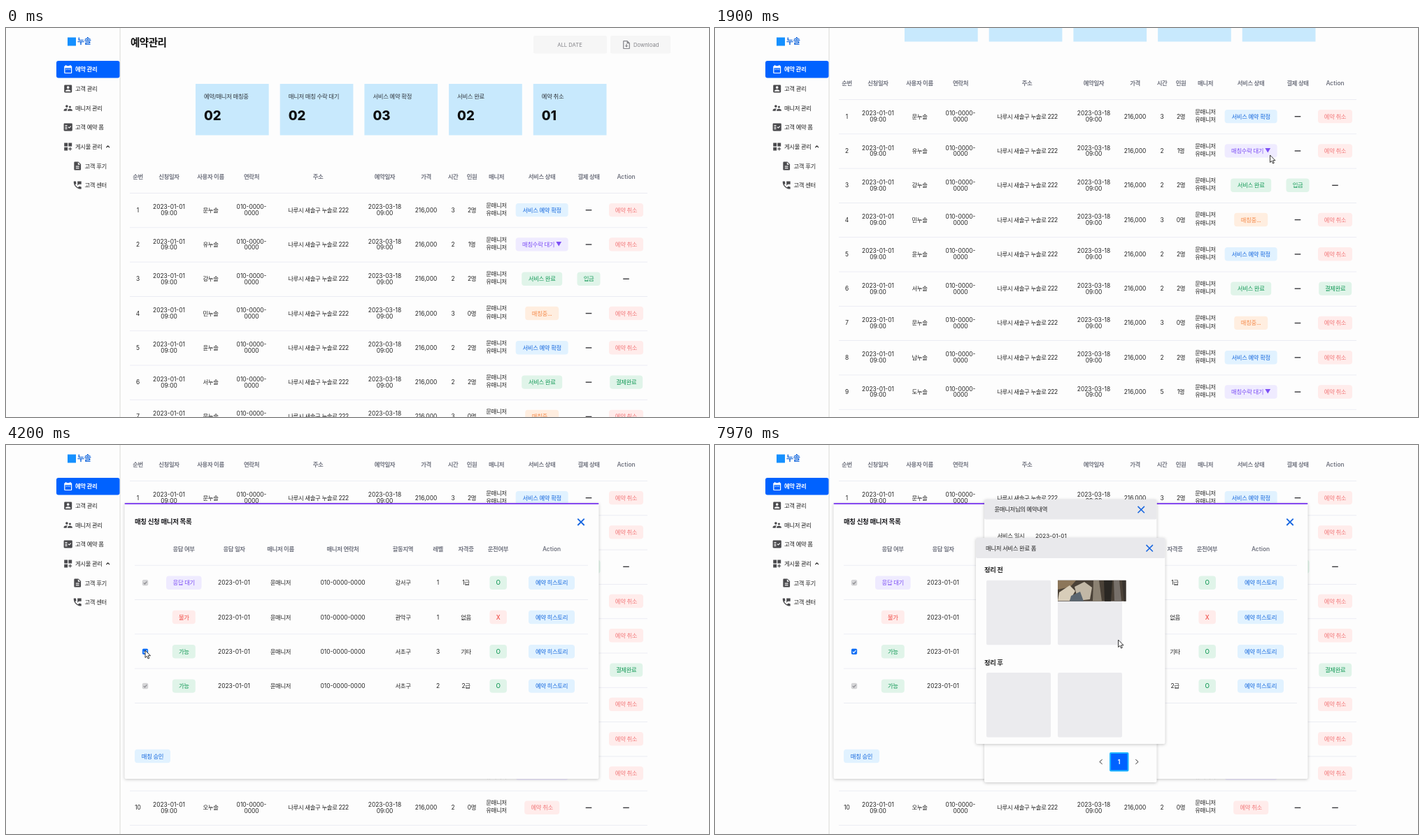
Recreate the animation shown at these times as an HTML page. Size 1005x557 px, loop 8 s.

```html
<!DOCTYPE html>
<html lang="ko">
<head>
<meta charset="utf-8">
<title>예약관리</title>
<style>
html, body { margin: 0; width: 100%; height: 100%; overflow: hidden; background: #fdfdfd; }
svg { display: block; width: 1005px; height: 557px; }
text { font-family: Inter, "Noto Sans CJK KR", "Noto Sans CJK", sans-serif; white-space: pre; }
.ko { letter-spacing: -.04em; }
.panel { filter: drop-shadow(0 1px 2px rgba(0, 0, 0, .22)); }
</style>
</head>
<body>
<svg id="stage" viewBox="0 0 1005 557"></svg>
<script>
const LOOP = 8000, ROW = 49.3, SIZE = 8.4;
const BRAND = '누솔', PHONE = '010-0000-0000', ADDRESS = '나루시 새솔구 누솔로 222';
const BLUE = '#0062ff', LINE = '#e8e9f2';

const tone = {
  blue: ['#e1f2ff', '#1769de'],
  purple: ['#efebff', '#7d4ff5'],
  green: ['#e0f4e9', '#159a58'],
  orange: ['#ffeee0', '#f58b4c'],
  pink: ['#ffeceb', '#f27b7d'],
  red: ['#ffeceb', '#f04b45'],
  gray: ['#ededee', '#b9b9bd']
};

// Drawing helpers; y is the vertical centre of text and badges
const text = (x, y, s, { size = SIZE, weight = 400, fill = '#222', anchor = 'start' } = {}) =>
  `<text x="${x}" y="${y + size * .36}" font-size="${size}" font-weight="${weight}" fill="${fill}" text-anchor="${anchor}"${/[가-힣]/.test(s) ? ' class="ko"' : ''}>${s}</text>`;
const mid = (x, y, s, o = {}) => text(x, y, s, { anchor: 'middle', ...o });
const rect = (x, y, w, h, fill, r = 0, more = '') =>
  `<rect x="${x}" y="${y}" width="${w}" height="${h}" rx="${r}" fill="${fill}" ${more}/>`;
const rule = (x1, x2, y, color = LINE) => rect(x1, y - .4, x2 - x1, .8, color);
const badge = (x, y, w, s, name) =>
  rect(x - w / 2, y - 9.7, w, 19.4, tone[name][0], 4) + mid(x, y, s, { fill: tone[name][1], weight: 500 });
const dash = (x, y) => rect(x - 4.3, y - .6, 8.6, 1.4, '#3c3c40');
const cross = (x, y, w = 1.8, r = 4.7) =>
  `<path d="M${x - r} ${y - r}l${2 * r} ${2 * r}m0 ${-2 * r}l${-2 * r} ${2 * r}" stroke="#1766e0" stroke-width="${w}" fill="none"/>`;
const icon = (x, y, d, fill = '#4a4a4d') =>
  `<path transform="translate(${x - 7.3} ${y - 7.3}) scale(.61)" d="${d}" fill="${fill}" fill-rule="evenodd"/>`;
const group = (id, body, more = '') => `<g id="${id}" ${more}>${body}</g>`;
const each = (list, fn) => list.map(fn).join('');

const icons = {
  date: 'M9 11H7v2h2v-2zm4 0h-2v2h2v-2zm4 0h-2v2h2v-2zm2-7h-1V2h-2v2H8V2H6v2H5c-1.1 0-2 .9-2 2v14c0 1.1.9 2 2 2h14c1.1 0 2-.9 2-2V6c0-1.1-.9-2-2-2zm0 16H5V9h14v11z',
  person: 'M3 5v14c0 1.1.9 2 2 2h14c1.1 0 2-.9 2-2V5c0-1.1-.9-2-2-2H5c-1.1 0-2 .9-2 2zm12 4a3 3 0 1 1-6 0 3 3 0 0 1 6 0zm-9 8c0-2 4-3.1 6-3.1s6 1.1 6 3.1v1H6v-1z',
  people: 'M16.5 12a2.5 2.5 0 1 0 0-5 2.5 2.5 0 0 0 0 5zM9 11a3 3 0 1 0 0-6 3 3 0 0 0 0 6zm7.5 3c-1.8 0-5.5.9-5.5 2.8V19h11v-2.2c0-1.9-3.7-2.8-5.5-2.8zM9 13c-2.3 0-7 1.2-7 3.5V19h7v-2.2c0-.9.3-2.4 2.4-3.5C10.5 13.1 9.7 13 9 13z',
  check: 'M20 3H4c-1.1 0-2 .9-2 2v14c0 1.1.9 2 2 2h16c1.1 0 2-.9 2-2V5c0-1.1-.9-2-2-2zM10 17H5v-2h5v2zm0-4H5v-2h5v2zm0-4H5V7h5v2zm4.8 6L12 12.2l1.4-1.4 1.4 1.4L18 9l1.4 1.4-4.6 4.6z',
  board: 'M3 3h8v8H3zM13 3h8v8h-8zM3 13h8v8H3zM18 13h-2v3h-3v2h3v3h2v-3h3v-2h-3z',
  doc: 'M14 2H6c-1.1 0-2 .9-2 2v16c0 1.1.9 2 2 2h12c1.1 0 2-.9 2-2V8l-6-6zm2 16H8v-2h8v2zm0-4H8v-2h8v2zm-3-5V3.5L18.5 9H13z',
  phone: 'M20 15.5c-1.2 0-2.4-.2-3.6-.6-.3-.1-.7 0-1 .3l-2.2 2.2c-2.8-1.5-5.1-3.8-6.6-6.6l2.2-2.2c.3-.3.4-.7.3-1C8.7 6.4 8.5 5.2 8.5 4c0-.6-.4-1-1-1H4c-.6 0-1 .4-1 1 0 9.4 7.6 17 17 17 .6 0 1-.4 1-1v-3.5c0-.6-.4-1-1-1zM12 3v10l3-3h6V3z',
  save: 'M14 2H6c-1.1 0-2 .9-2 2v16c0 1.1.9 2 2 2h12c1.1 0 2-.9 2-2V8zM13 4v5h5v11H6V4zM11 10h2v4h2.5L12 18l-3.500-4H11z'
};

function sidebar() {
  const items = [
    ['date', '예약 관리', 59], ['person', '고객 관리', 87], ['people', '매니저 관리', 114.5],
    ['check', '고객 예약 폼', 142], ['board', '게시물 관리', 170],
    ['doc', '고객 후기', 197.5, 13.5], ['phone', '고객 센터', 225, 13.5]
  ];
  return rect(162.6, 0, .9, 557, '#d6d6d2') +
    rect(88, 13.500, 12, 12, '#1590ff') +
    text(102, 19, BRAND, { size: 11, weight: 700, fill: '#1266dc' }) +
    rect(72, 47, 90.5, 24.5, BLUE, 3) +
    each(items, ([name, label, y, dx = 0], i) =>
      icon(88.7 + dx, y, icons[name], i ? undefined : '#fff') +
      text(99 + dx, y, label, { weight: i ? 500 : 600, fill: i ? '#222' : '#fff' })) +
    '<path d="M143.400 171.200l2.300-2.300 2.300 2.300" fill="none" stroke="#222" stroke-width="1.200"/>';
}

function table() {
  const heads = [['순번', 188.5], ['신청일자', 233], ['사용자 이름', 292.5], ['연락처', 351], ['주소', 446],
    ['예약일자', 541.5], ['가격', 600.5], ['시간', 639], ['인원', 666], ['매니저', 701],
    ['서비스 상태', 766], ['결제 상태', 833], ['Action', 886.5]];
  const states = {
    A: ['서비스 예약 확정', 75, 'blue'], B: ['매칭수락 대기 ▼', 75, 'purple'],
    C: ['서비스 완료', 58, 'green'], D: ['매칭중...', 48, 'orange'], E: ['예약 취소', 50, 'pink']
  };
  const rows = ['문 3 2 A', '유 2 1 B', '강 2 2 C', '민 3 0 D', '윤 2 2 A',
    '서 2 2 C', '문 3 0 D', '남 2 2 A', '도 5 1 B', '오 2 0 E'];
  const two = (x, y, a, b, gap = 4.4) => mid(x, y - gap, a) + mid(x, y + gap, b);
  return each(heads, ([s, x]) => mid(x, 213, s, { weight: 600, fill: '#737682' })) + rule(177, 917, 236.5) +
    each(rows, (row, i) => {
      const [name, hours, count, key] = row.split(' ');
      const y = 260.6 + i * ROW, [label, w, color] = states[key];
      const action = i === 2 || i === 9 ? dash(886.5, y)
        : i === 5 ? badge(886.700, y, 47, '결제완료', 'green') : badge(886.5, y, 49, '예약 취소', 'pink');
      return mid(188.5, y, String(i + 1)) + two(233, y, '2023-01-01', '09:00') + mid(292.5, y, name + BRAND) +
        two(351, y, PHONE.slice(0, 9), PHONE.slice(9)) + mid(446.5, y, ADDRESS) +
        two(541.5, y, '2023-03-18', '09:00') + mid(600.5, y, '216,000') + mid(639, y, hours) +
        mid(666, y, count + '명') + two(701, y - 1.5, '문매니저', '유매니저', 5.600) +
        badge(766.2, y, w, label, color) +
        (i === 2 ? badge(833, y, 33, '입금', 'green') : dash(833, y)) + action +
        rule(177, 917, 236.5 + (i + 1) * ROW);
    });
}

function content() {
  const cards = [['예약/매니저 매칭중', '02'], ['매니저 매칭 수락 대기', '02'], ['서비스 예약 확정', '03'],
    ['서비스 완료', '02'], ['예약 취소', '01']];
  const gray = { fill: '#85858a', size: 7.7 };
  return text(178, 21, '예약관리', { size: 14.6, weight: 700, fill: '#111' }) +
    rect(754, 11, 105, 25.5, '#f6f6f6', 2) + mid(806, 24, 'ALL DATE', gray) +
    rect(864, 11, 86, 25.5, '#f6f6f6', 2) + icon(887, 24, icons.save, '#85858a') + text(897, 24, 'Download', gray) +
    each(cards, ([label, n], i) => {
      const x = 271 + i * 120.7;
      return rect(x, 80, 104.7, 73.5, '#c8e9fd') + text(x + 12, 98.3, label, { fill: '#30363c' }) +
        text(x + 12, 125.5, n, { size: 18.6, weight: 800, fill: '#0d0d0f' });
    }) + table();
}

function box(x, y, kind) {
  const look = { off: ['#f6f6f6', '#d0d0d0'], open: ['#fff', '#6f6f74'], on: ['#0b6cf5', '#0b6cf5'], gray: ['#d6d6d8', '#c9c9cc'] }[kind];
  const mark = { on: '#fff', gray: '#8d8d91' }[kind];
  return rect(x - 3.7, y - 3.7, 7.4, 7.4, look[0], 1.3, `stroke="${look[1]}" stroke-width=".8"`) +
    (mark ? `<path d="M${x - 2.2} ${y + .1}l1.600 1.700 3-3.500" fill="none" stroke="${mark}" stroke-width="1.200"/>` : '');
}

function managers() {
  const heads = [['응답 여부', 254], ['응답 일자', 326], ['매니저 이름', 392.5], ['매니저 연락처', 481.5], ['활동지역', 567.5],
    ['레벨', 617.5], ['자격증', 657.5], ['운전여부', 703.5], ['Action', 780]];
  const rows = [['응답 대기', 'purple', '강서구', '1', '1급', 'O'], ['불가', 'red', '관악구', '1', '없음', 'X'],
    ['가능', 'green', '서초구', '3', '기타', 'O'], ['가능', 'green', '서초구', '2', '2급', 'O']];
  const ys = rows.map((_, i) => 197.2 + i * ROW);
  const boxes = (a, b) => box(199, ys[0], a) + box(199, ys[2], b) + box(199, ys[3], a);
  return group('managersBg', rect(169.5, 83, 678, 395, '#fdfdfd', 2), 'class="panel"') +
    rect(169.5, 83, 678, 2, '#8549f0', 1) +
    text(184, 109.7, '매칭 신청 매니저 목록', { size: 9.5, weight: 600, fill: '#1c1c20' }) + cross(822, 110.3) +
    each(heads, ([s, x]) => mid(x, 149, s, { weight: 600, fill: '#737682' })) + rule(184, 832, 172.2) +
    each(rows, ([state, color, area, level, cert, car], i) => {
      const y = ys[i];
      return badge(254.3, y, i ? 33 : 50.5, state, color) + mid(326, y, '2023-01-01') + mid(392.5, y, '윤매니저') +
        mid(481.5, y, PHONE) + mid(567.5, y, area) + mid(617.5, y, level) + mid(657.5, y, cert) +
        badge(703.700, y, 24.5, car, car === 'O' ? 'green' : 'red') + badge(780, y, 66, '예약 히스토리', 'blue') +
        rule(184, 832, 172.2 + (i + 1) * ROW);
    }) +
    group('unpicked', boxes('off', 'open') + badge(209.5, 445.5, 51, '매칭 승인', 'gray')) +
    group('picked', boxes('gray', 'on') + badge(209.5, 445.5, 51, '매칭 승인', 'blue'));
}

const panel = (x, y, w, h, head, title, titleX) =>
  rect(x, y, w, h, '#fdfdfd', 2, 'class="panel"') + rect(x, y, w, head, '#e9e9ec', 2) +
  text(titleX, y + head / 2 + .2, title, { weight: 500 }) + cross(x + w - 22.3, y + head / 2 + .3, 1.5);

function history() {
  const dates = ['2023-01-01', '2023-01-11', '2023-02-06', '2023-03-18', '2023-06-26'];
  const arrow = (x, d) => `<path d="M${x - d} 450.300l${2 * d} 3.300 ${-2 * d} 3.300" fill="none" stroke="#333" stroke-width="1"/>`;
  return panel(385, 78, 246.500, 405, 28.5, '윤매니저님의 예약내역', 399.5) +
    each(dates, (d, i) => {
      const y = 130 + i * 62.85;
      return text(403.5, y, '서비스 일시') + text(458, y, d, { size: 8.2 }) + rule(396, 620, y + 11.3) +
        badge(443.5, y + 27, 58, '고객예약 폼', 'blue') + badge(555.700, y + 27, 92.5, '매니저 서비스 완료 폼', 'blue');
    }) + arrow(551.700, -1.9) + arrow(603.200, 1.9) +
    rect(565, 441, 25.5, 25.5, BLUE, 1, 'stroke="#1db4ff" stroke-width="2"') +
    mid(577.6, 453.7, '1', { weight: 700, fill: '#fff' });
}

function booking() {
  const head = (x, y, s) => text(x, y, s, { weight: 700, fill: '#151518' });
  const left = (y, k, v, end = 500) => text(283, y, k) + text(348, y, v) + rule(280, end, y + 10.3);
  const right = (y, k, v) => text(519, y, k) + text(583.5, y, v);
  const ruled = (y, k, v) => right(y, k, v) + rule(516, 736, y + 10.3);
  return panel(267.5, 101, 481, 359, 30, '고객예약 폼', 282.5) +
    head(280, 151.5, '고객 정보') + left(170, '이름', '윤하람', 736) + left(191, '연락처', PHONE, 736) + left(212, '주소', ADDRESS, 736) +
    head(280, 247, '서비스 신청 정보') + left(266, '옷 분량', '4인분') + left(286.7, '소요시간', '3시간') +
    head(280, 321.7, '예약 정보') + left(340.3, '서비스 날짜', '2023-02-12') + left(361.2, '서비스 시간', '13:00:00') +
    head(516, 247, '세부 정보') + ruled(266, '주차여부', '건물 주차장 이용 가능') + ruled(286.7, '출입정보', '없음') +
    right(307.5, '매니저가 알아야', '고양이 1마리 키워요') + text(519, 319.2, '할 정보') + rule(516, 736, 329.7) +
    right(340.3, '요청사항', '옷이 많아서 옷걸이가 많이 필요해요') +
    head(516, 396.2, '기타 정보') + ruled(414.8, '추천인 코드', 'QK7B42') + ruled(435.8, BRAND + ' 인지 경로', '담솔사진첩');
}

function report() {
  const slot = (x, y) => rect(x, y, 92, 92.5, '#ebebee', 2);
  const shape = (d, fill) => `<path d="${d}" fill="${fill}"/>`;
  const photo = rect(490, 193.700, 97.500, 30, '#4a4137') +
    shape('M490 194h26l-8 9-18 4z', '#8c765a') + shape('M492 211l15-10 8 8-8 14h-17z', '#d8cdb9') +
    shape('M514 203l14-7 11 8-3 17-17 2z', '#c2b8a6') + shape('M509 216l13-6 5 13.700h-20z', '#5b6670') +
    shape('M541 194h8l4 29.700h-13z', '#8b8172') + shape('M556 194h12l-2 29.700h-9z', '#2a2723') +
    shape('M570 194h8l3 29.700h-10z', '#77706a') + shape('M582 194h5.500v29.700h-3z', '#38332e');
  return panel(373, 133, 270.500, 295, 29, '매니저 서비스 완료 폼', 387) +
    text(385, 179, '정리 전', { size: 9.300, weight: 600 }) + slot(388, 193.700) + slot(490, 193.700) +
    text(385, 312, '정리 후', { size: 9.300, weight: 600 }) + slot(388, 326) + slot(490, 326) + group('photo', photo);
}

const pointers =
  group('arrow', '<path d="M0 0v10.500l2.400-2.200 1.700 3.700 1.700-.8-1.700-3.500h3.400z" fill="#fff" stroke="#222" stroke-width=".9" stroke-linejoin="round"/>') +
  group('hand', '<path d="M-1.200 7.500V1c0-1.300 2-1.300 2 0v3.700c.4-.8 1.900-.6 1.900.3.500-.6 1.700-.4 1.700.5.500-.5 1.500-.2 1.500.7v3.300c0 1.500-1 2.500-1 4.500h-5C-.5 11.500-3 9.700-4 7.800c-.5-1.200.9-1.800 1.600-.9z" fill="#fff" stroke="#222" stroke-width=".9" stroke-linejoin="round"/>');

const stage = document.getElementById('stage');
stage.innerHTML =
  group('page', group('content', content()) + group('sidebar', sidebar())) +
  group('managers', managers()) + group('history', history()) +
  group('booking', booking()) + group('report', report()) + group('pointer', pointers);

const el = {};
stage.querySelectorAll('[id]').forEach(n => el[n.id] = n);

// Steps: time, then values
const scrollSteps = [[920, 0], [1300, 98], [1480, 134], [1960, 134], [2260, 185]];
const pointerSteps = [[840, 990, 250], [1120, 804.5, 174], [1350, 804.5, 174], [1700, 793.5, 182], [1950, 793.5, 182],
  [2350, 776, 131.500], [3150, 776, 131.500], [3800, 199, 294], [4300, 199, 294], [4950, 785, 290.5], [5450, 785, 290.5],
  [6050, 446, 282], [6300, 446, 282], [6900, 726, 119.5], [7160, 726, 119.5], [7580, 576.5, 279]];
const spans = { managers: [2540, LOOP], history: [5180, LOOP], booking: [6180, 7140], report: [7730, LOOP], photo: [7860, LOOP], picked: [3920, LOOP], unpicked: [0, 3920], pointer: [840, LOOP] };

function at(steps, t) {
  if (t <= steps[0][0]) return steps[0].slice(1);
  for (let i = 1; i < steps.length; i++) {
    const a = steps[i - 1], b = steps[i];
    if (t < b[0]) {
      const u = (t - a[0]) / (b[0] - a[0]), k = u * u * (3 - 2 * u);
      return a.slice(1).map((v, j) => v + (b[j + 1] - v) * k);
    }
  }
  return steps[steps.length - 1].slice(1);
}

const blur = (node, v) => { node.style.filter = v ? `blur(${v}px)` : 'none'; };

function draw(t) {
  const on = {};
  for (const id in spans) {
    on[id] = t >= spans[id][0] && t < spans[id][1];
    el[id].style.display = on[id] ? '' : 'none';
  }
  const top = on.booking || on.report;
  blur(el.page, on.managers ? .6 : 0);
  blur(el.managers, top ? .75 : on.history ? .55 : 0);
  blur(el.history, top ? .5 : 0);
  el.content.setAttribute('transform', `translate(0 ${-at(scrollSteps, t)[0]})`);
  const [x, y] = at(pointerSteps, t);
  el.pointer.setAttribute('transform', `translate(${x} ${y})`);
  const hand = on.booking && Math.hypot(x - 726, y - 117) < 9;
  el.hand.style.display = hand ? '' : 'none';
  el.arrow.style.display = hand ? 'none' : '';
}

const start = performance.now();
function tick() {
  draw((performance.now() - start) % LOOP);
  requestAnimationFrame(tick);
}
tick();
</script>
</body>
</html>
```
